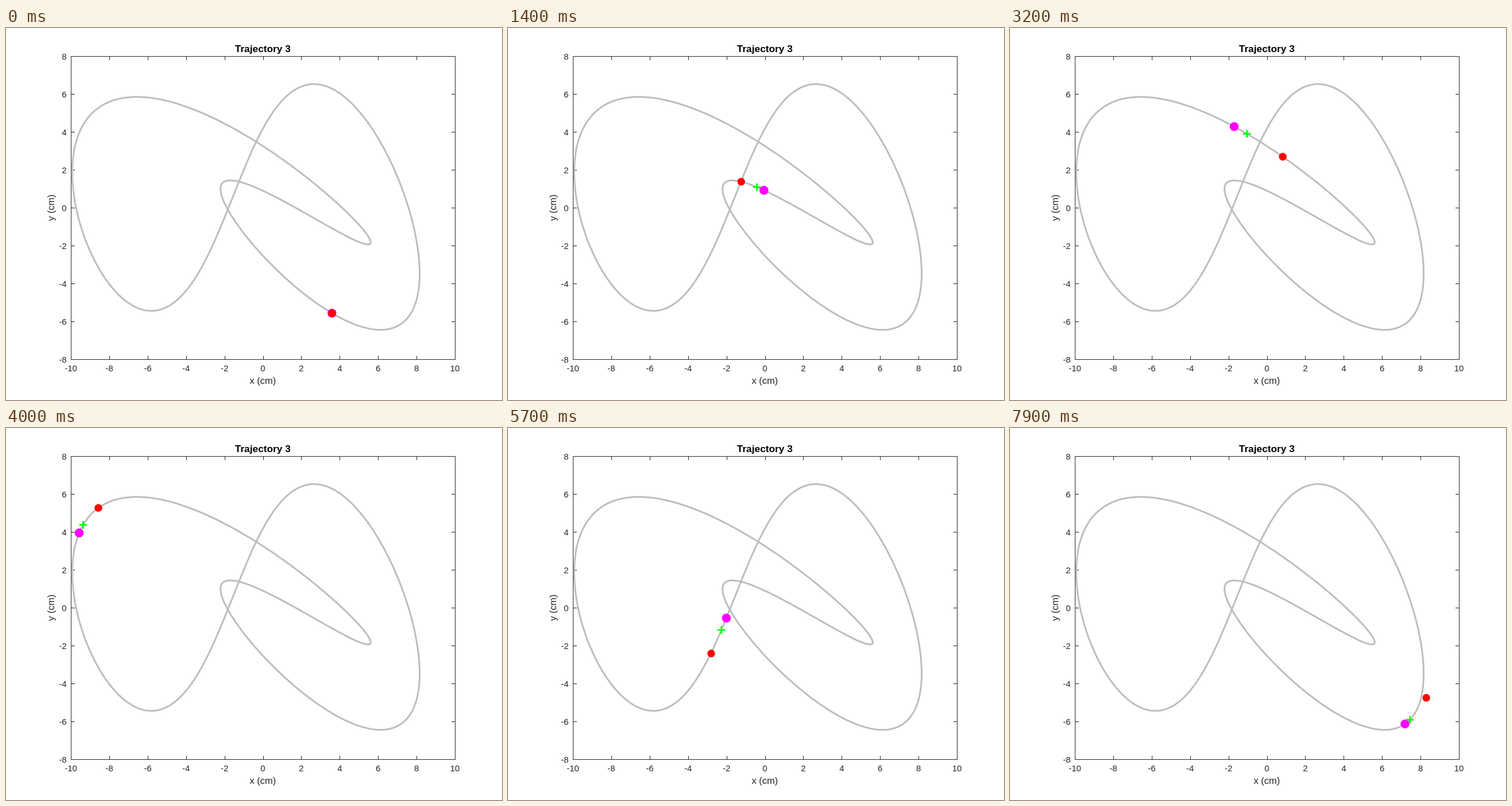
These frames come from a looping animation (864 px wide and 648 px high, 8000 ms). An HTML page with a canvas:

```html
<!DOCTYPE html>
<html lang="en">
<head>
<meta charset="utf-8">
<title>Trajectory 3</title>
<style>
  html, body { margin: 0; width: 100%; height: 100%; overflow: hidden; background: #fff; }
  canvas { display: block; }
</style>
</head>
<body>
<canvas id="stage" width="864" height="648"></canvas>
<script>
const ctx = document.getElementById('stage').getContext('2d');
const LOOP = 8000, STEP = 100, PERIOD = 8.35;
const LEFT = 113, RIGHT = 782, TOP = 49, BOTTOM = 577;
const FONT = '"Liberation Sans", Arial, sans-serif';

// Cosine and sine amplitudes of each harmonic, in cm
const X = [[5.372, 0], [-3.12, -3.418], [1.388, -2.035], [-.044, .036]];
const Y = [[-1.535, .005], [-1.814, -1.747], [-2.328, 3.78], [.109, -.048]];

const toX = cm => LEFT + (cm + 10) / 20 * (RIGHT - LEFT);
const toY = cm => TOP + (8 - cm) / 16 * (BOTTOM - TOP);

function wave(harmonics, t) {
  const angle = 2 * Math.PI * t / PERIOD;
  return harmonics.reduce((sum, [a, b], i) =>
    sum + a * Math.cos(angle * (i + 1)) + b * Math.sin(angle * (i + 1)), 0);
}

const path = t => [toX(wave(X, t)), toY(wave(Y, t))];

const green = t => path(t - Math.min(t, .05));

// The red dot trails by a swaying delay and swings wide near the end.
function red(t) {
  const lag = .18 + .005 * t * Math.cos(1.3 * (t - 3));
  const [x, y] = path(t - Math.min(t, lag));
  return [x + 10 * (t / 8) ** 8, y];
}

function line(x1, y1, x2, y2) {
  ctx.beginPath();
  ctx.moveTo(x1, y1);
  ctx.lineTo(x2, y2);
  ctx.stroke();
}

function text(str, x, y, size, align = 'center', weight = '') {
  ctx.font = `${weight} ${size}px ${FONT}`;
  ctx.textAlign = align;
  ctx.fillText(str, x, y);
}

function drawAxes() {
  const tick = 6.5;
  ctx.strokeStyle = ctx.fillStyle = '#262626';
  ctx.lineWidth = 1;
  ctx.save();
  ctx.translate(.5, .5); // keeps one pixel lines sharp
  ctx.strokeRect(LEFT, TOP, RIGHT - LEFT, BOTTOM - TOP);
  for (let v = -10; v <= 10; v += 2) {
    const x = Math.round(toX(v));
    line(x, BOTTOM, x, BOTTOM - tick);
    line(x, TOP, x, TOP + tick);
    text(v, toX(v) - .5, 597.5, 15);
  }
  for (let v = -8; v <= 8; v += 2) {
    const y = Math.round(toY(v));
    line(LEFT, y, LEFT + tick, y);
    line(RIGHT, y, RIGHT - tick, y);
    text(v, 105, toY(v) + 5, 15, 'right');
  }
  ctx.restore();
  text('x (cm)', 447.3, 620, 16.5);
  ctx.save();
  ctx.translate(84, 313);
  ctx.rotate(-Math.PI / 2);
  text('y (cm)', 0, 0, 16.5);
  ctx.restore();
  ctx.fillStyle = '#000';
  text('Trajectory 3', 447.3, 42, 17.3, 'center', 'bold');
}

function drawPath() {
  ctx.strokeStyle = '#bdbdbd';
  ctx.lineWidth = 3;
  ctx.beginPath();
  for (let i = 0; i < 500; i++) ctx.lineTo(...path(i / 500 * PERIOD));
  ctx.closePath();
  ctx.stroke();
}

function disc([x, y], radius, color) {
  ctx.fillStyle = color;
  ctx.beginPath();
  ctx.arc(x, y, radius, 0, 2 * Math.PI);
  ctx.fill();
}

function cross([x, y], arm) {
  ctx.strokeStyle = '#0f0';
  ctx.lineWidth = 2.7;
  line(x - arm, y, x + arm, y);
  line(x, y - arm, x, y + arm);
}

const start = performance.now();

function frame(now) {
  const elapsed = Math.max(0, now - start) % LOOP;
  const t = Math.floor(elapsed / STEP) * STEP / 1000;
  ctx.fillStyle = '#fff';
  ctx.fillRect(0, 0, 864, 648);
  drawAxes();
  drawPath();
  disc(path(t), 7.8, '#f0f');
  cross(green(t), 6.8);
  disc(red(t), 6.7, '#f00');
  requestAnimationFrame(frame);
}
requestAnimationFrame(frame);
</script>
</body>
</html>
```
